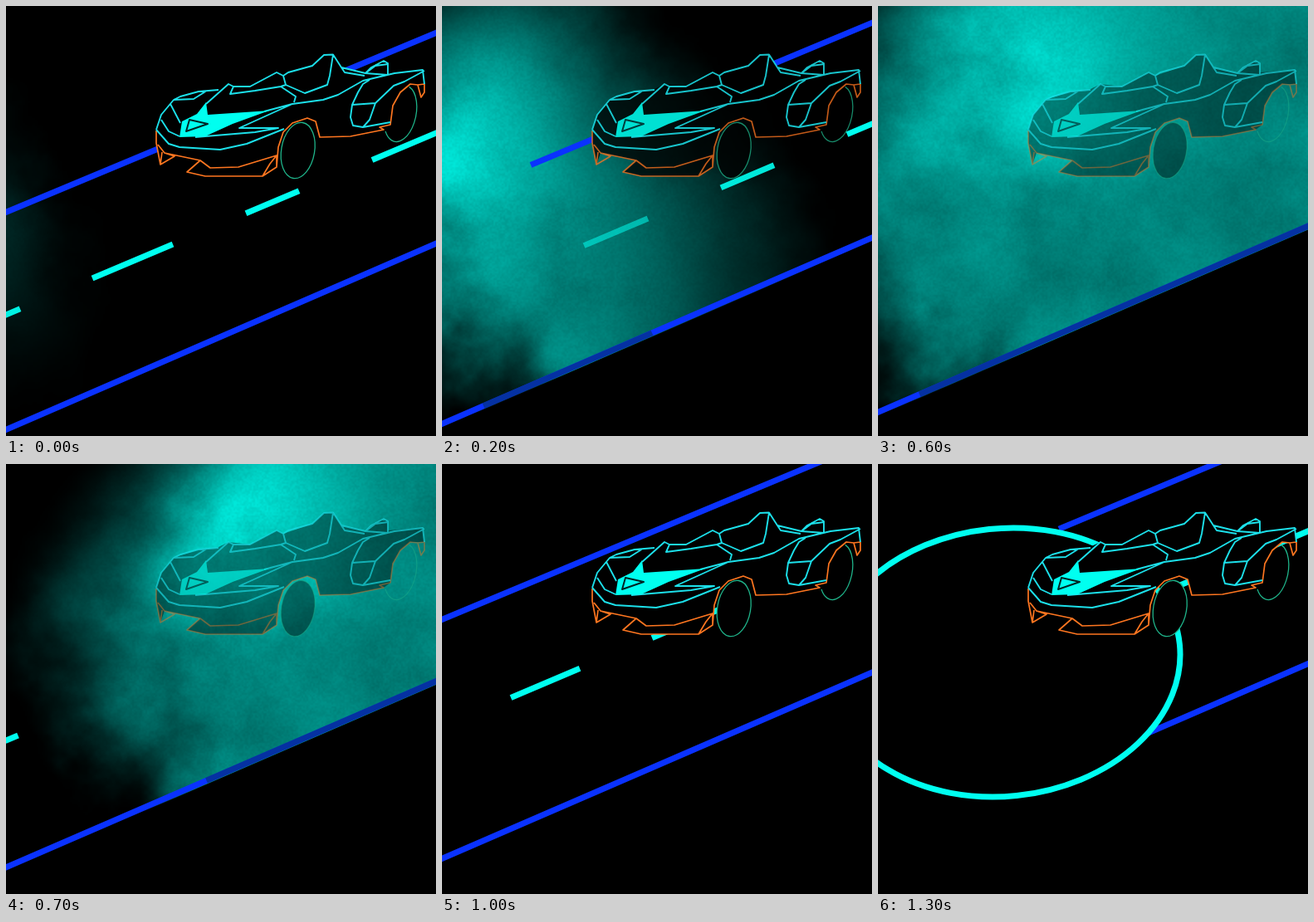
Animation, 518 px wide and 518 px high, one loop 1.4 s. Source, as an HTML page with a canvas:

```html
<!DOCTYPE html>
<html lang="en">
<head>
<meta charset="utf-8">
<title>Neon car</title>
<style>
html, body { margin: 0; width: 100%; height: 100%; overflow: hidden; background: #000; }
canvas { display: block; width: 100vw; height: 100vh; }
</style>
</head>
<body>
<canvas id="stage" width="518" height="518"></canvas>
<script>
const SIZE = 518, HALF = 259, LOOP = 1400, STEP = 100, SPEED = 1.915;
const CYAN = '#00fff0', BLUE = '#0a32ff';
const ctx = document.getElementById('stage').getContext('2d');
const fog = document.createElement('canvas');
fog.width = fog.height = HALF;
const fogCtx = fog.getContext('2d');
const fogData = fogCtx.createImageData(HALF, HALF);

// Car
const body = new Path2D('M181 149L187 131 202 113 232 103 254 101 268 94 294 97 326 80 334 84 369 72 383 59 394 58.5 404 74 433 81 440 74 455 66 460 69 460 80 502 77 504 94 487 94 475 104 466 120 463 143 455 149 415 157 378 158 373 139 363 135 345 141 334 152 328 170 326 194 309 205 240 205 218 200 234 186 191 177 186 191 181 165Z');
const creases = new Path2D(
  'M181 149L187 131 202 113 210 109 232 103 256 101M198 118L210 141M202 113L226 112 242 102' +
  'M241 118L268 94 274 97 294 97 326 80 334 84 337 95 331 97 300 102 270 106 274 97' +
  'M331 97L349 109 347 116M334 84L340 80 369 72 383 59 394 58.5 404 74 433 81 440 74 455 66 460 69 460 82' +
  'M394 58.5L390 84 387 95 360 105 337 95M433 81L445 72 460 70M433 81L460 83' +
  'M311 127L345 118 382 113 400 107 430 90 468 81 502 77 504 94M504 78L480 91 467 96 445 117 438 137 430 146 418 144 415 134 417 119 424 104 430 94 438 89' +
  'M417 119L445 117M430 146L463 140M404 74L408 80 432 84' +
  'M181 149L196 166 209 170 258 173 290 166 335 148' +
  'M228 158L300 152 328 147 281 147 345 118M187 137L196 151 209 157');
const hood = new Path2D('M241 116L230 130 212 139 209 158 240 157 273 142 317 126 243 131Z');
const badge = new Path2D('M221 137L243 142 217 151Z');
const skirt = new Path2D(
  'M181 150L181 165 186 191 203 181 191 177 183 167M188 176L186 191M191 177L234 186 246 195 280 194 326 180 326 194 309 205 240 205 218 200 234 186' +
  'M309 205L318 190 326 180M326 194L328 170 334 152 345 141 363 135 373 139 378 158 415 157 455 149 450 146 463 143 466 120 475 104 487 94 496 95 500 110 504 104 504 94 496 95');
const wheel = new Path2D(), rearWheel = new Path2D();
wheel.ellipse(351.7, 174, 20, 34, .17, 0, 7);
rearWheel.ellipse(475, 129.5, 19, 34.5, .2, -1.35, 2.35);
const outside = [body, wheel].map(p => {
  const path = new Path2D(p);
  path.rect(0, 0, SIZE, SIZE);
  return path;
});

const mix = (a, b, k) => a + (b - a) * k;
const clamp = v => Math.max(0, Math.min(1, v));
const smooth = v => v * v * (3 - 2 * v);

function hash(x, y) {
  const v = Math.sin(x * 127.1 + y * 311.7) * 43758.5453;
  return v - Math.floor(v);
}
function noise(x, y) {
  const i = Math.floor(x), j = Math.floor(y), u = smooth(x - i), v = smooth(y - j);
  return mix(mix(hash(i, j), hash(i + 1, j), u), mix(hash(i, j + 1), hash(i + 1, j + 1), u), v);
}
function cloud(x, y) {
  let sum = 0;
  for (let size = 80, gain = .5; size > 4; size /= 2.3, gain /= 2) sum += gain * noise(x / size, y / size);
  return sum - .47;
}

// The smoke is a bank with a bowed front and tail, both crossing to the right
const front = t => SPEED * t - 60;
const tail = t => SPEED * Math.max(0, t - 600) - 90;
function cover(x, y, t) {
  const ahead = front(t) - 60 * ((y - 360) / 200) ** 2 - x;
  const behind = x - tail(t) - 110 * ((y - 200) / 200) ** 2;
  return smooth(clamp(.5 + ahead / 360)) * smooth(clamp(.5 + behind / 260));
}
function density(x, y, t) {
  const glowX = (t - 200) ** 2 / 860, glowY = 220 - t / 4;
  const glow = Math.exp(-((x - glowX) ** 2 + (y - glowY) ** 2) / 17000);
  return cover(x, y, t) * (.56 + .34 * glow);
}

function drawSmoke(t, bottom) {
  const px = fogData.data;
  for (let n = 0, p = 0; n < HALF * HALF; n++, p += 4) {
    const x = n % HALF * 2, y = Math.floor(n / HALF) * 2;
    const c = cloud(x - t / 8 + 900, y + t / 20 + 300);
    const grain = (hash(x, y) - .5) * .1;
    const v = clamp(density(x + c * 80, y - c * 60, t) * (1 + c * .45 + grain));
    px[p + 1] = 232 * v;
    px[p + 2] = 218 * v;
    px[p + 3] = 255;
  }
  fogCtx.putImageData(fogData, 0, 0);
  ctx.save();
  ctx.beginPath();
  ctx.moveTo(0, 0);
  ctx.lineTo(0, bottom(0) + 4.5);
  ctx.lineTo(SIZE, bottom(SIZE) + 4.5);
  ctx.lineTo(SIZE, 0);
  ctx.clip();
  ctx.drawImage(fog, 0, 0, SIZE, SIZE);
  ctx.restore();
}

function lane(y, from, to, color) {
  if (to <= from) return;
  ctx.strokeStyle = color;
  ctx.beginPath();
  ctx.moveTo(from, y(from));
  ctx.lineTo(to, y(to));
  ctx.stroke();
}

function dashes(t) {
  if (t < 400) {
    const d = t * .235;
    return [[-80, 17], [104, 201], [289, 353], [441, 530]].map(([a, b]) => [a + d, b + d]);
  }
  if (t >= 1300) return [[340, 530]];
  const d = (t - 800) / 200;
  return [[27 + 56 * d, 65 + 101 * d], [152 + 101 * d, 250 + 110 * d]];
}

function drawRoad(t, bottom) {
  const top = x => 248.4 - .061 * t - .417 * x;
  const middle = x => 372 - .0555 * t - .4227 * x;
  const late = t >= 700, ring = t >= 1200;
  const edge = (x, time) => x + SPEED * (t - time);
  const start = x => ring ? edge(x, 1300) : -10;

  ctx.save();
  outside.forEach(p => ctx.clip(p, 'evenodd'));
  ctx.lineWidth = 7;
  lane(top, late ? start(218) : Math.max(-10, edge(107, 200)), late ? Math.min(530, edge(190, 800)) : 530, BLUE);
  const from = late ? start(364) : edge(171, 200);
  const to = late ? edge(240, 800) : 530;
  for (const [a, b] of dashes(t)) {
    const x = (a + b) / 2;
    ctx.globalAlpha = late ? 1 : 1 - .5 * cover(x, middle(x), t);
    lane(middle, Math.max(a, from), Math.min(b, to), CYAN);
  }
  ctx.globalAlpha = 1;
  lane(bottom, start(325), 530, BLUE);
  lane(bottom, Math.max(-10, tail(t) + 140), Math.min(530, front(t) - 70), 'rgba(0,48,70,.5)');
  if (ring) {
    ctx.strokeStyle = CYAN;
    ctx.beginPath();
    ctx.ellipse(edge(150.5, 1300), 239 - .84 * (t - 1300), 214, 161.4, -.103, 0, 7);
    ctx.stroke();
  }
  ctx.restore();
}

function drawCar(t) {
  const line = (path, color, width) => {
    ctx.strokeStyle = color;
    ctx.lineWidth = width;
    ctx.stroke(path);
  };
  const alpha = 1 - .58 * cover(290, 170, t);
  ctx.globalAlpha = alpha;
  ctx.lineJoin = 'round';
  ctx.fillStyle = '#000';
  ctx.fill(body);
  ctx.fill(wheel);
  line(wheel, '#1fb48a', 1.3);
  line(rearWheel, '#1fb48a', 1.3);
  line(skirt, '#ff7620', 1.7);
  ctx.globalAlpha = Math.sqrt(alpha);
  line(creases, '#1ce0ea', 1.9);
  ctx.fillStyle = CYAN;
  ctx.fill(hood);
  line(badge, '#002424', 2);
  ctx.globalAlpha = 1;
}

function draw(t) {
  const bottom = x => 510.4 - .035 * t - .433 * x;
  ctx.fillStyle = '#000';
  ctx.fillRect(0, 0, SIZE, SIZE);
  drawSmoke(t, bottom);
  drawRoad(t, bottom);
  drawCar(t);
}

const begin = performance.now();
let shown = -1;
function tick() {
  const t = Math.floor((performance.now() - begin) % LOOP / STEP) * STEP;
  if (t !== shown) draw(shown = t);
  requestAnimationFrame(tick);
}
tick();
</script>
</body>
</html>
```
